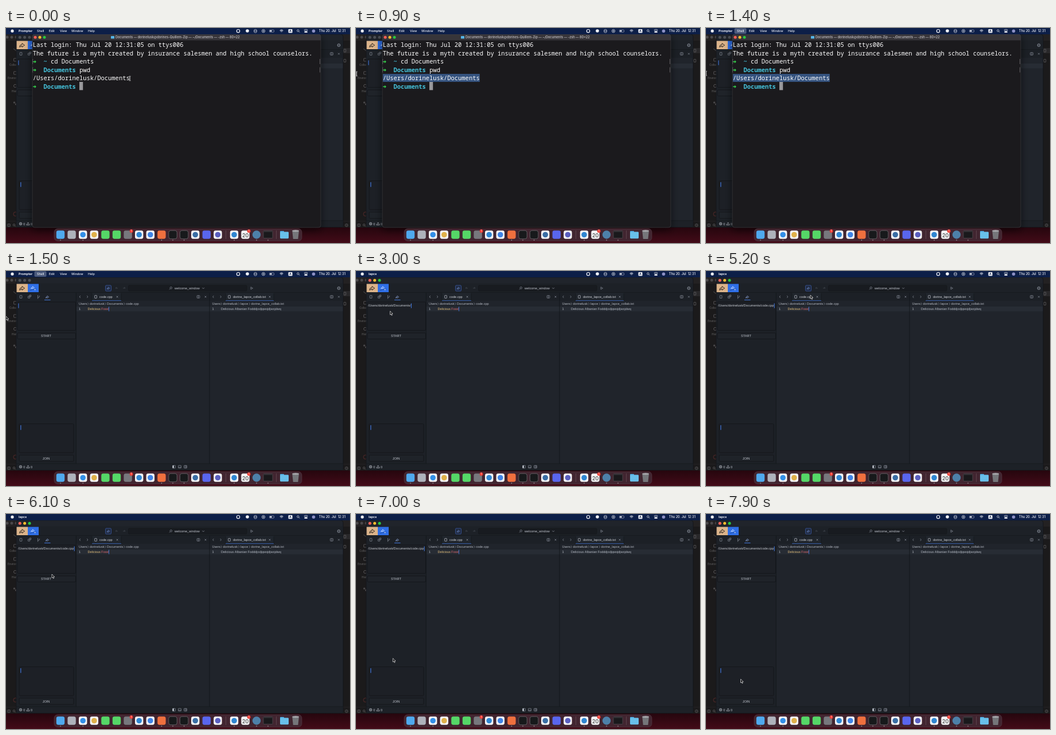
Recreate the animation shown at these times as an HTML page with a canvas. Size 600 by 375 pixels, loop 8000 ms.

```html
<!DOCTYPE html>
<html lang="en">
<head>
<meta charset="utf-8">
<title>Desktop session</title>
<style>
html, body { margin: 0; width: 100%; height: 100%; overflow: hidden; background: #2a0912; }
canvas { display: block; width: 600px; height: 375px; }
</style>
</head>
<body>
<canvas id="stage"></canvas>
<script>
const W = 600, H = 375, LOOP = 8000, STEP = 100;
const cv = document.getElementById('stage');
const dpr = window.devicePixelRatio || 1;
cv.width = W * dpr;
cv.height = H * dpr;
const c = cv.getContext('2d');

const SANS = '"Liberation Sans", Arial, sans-serif';
const UI = 'Inter, "Liberation Sans", sans-serif';
const MONO = '"Noto Sans Mono", "DejaVu Sans Mono", monospace';
const USER = 'dorinelusk';
const BLUE = '#3f74d8', DIM = '#8b919c', FAINT = '#4a505b', INK = '#c3c8d0', EDGE = '#14171b', NAVY = '#0d1f48';

// Event times in ms
const CLOSE = 1500, FOCUS = 2300, PASTE = 2700, TYPE = 3200, KEY = 150;

const pointer = [
  [0, 216, 88], [200, 216, 88], [800, 1, 80], [1600, 0, 79], [2200, 59, 69],
  [3000, 59.5, 70], [4500, 59.5, 70], [5100, 182, 42], [5300, 182, 42],
  [6000, 80, 105], [6500, 80, 105], [7200, 60.5, 288], [LOOP, 60.5, 288]
];

function pointerAt(t) {
  const i = pointer.findIndex(k => k[0] > t);
  const [t0, x0, y0] = pointer[i - 1], [t1, x1, y1] = pointer[i];
  const p = (t - t0) / (t1 - t0), e = p * p * (3 - 2 * p);
  return [x0 + (x1 - x0) * e, y0 + (y1 - y0) * e];
}

function rect(x, y, w, h, fill) {
  c.fillStyle = fill;
  c.fillRect(x, y, w, h);
}

function box(x, y, w, h, r, fill, stroke, lw = 0.7) {
  c.beginPath();
  c.roundRect(x, y, w, h, r);
  if (fill) { c.fillStyle = fill; c.fill(); }
  if (stroke) { c.strokeStyle = stroke; c.lineWidth = lw; c.stroke(); }
}

function disc(x, y, r, fill, stroke, lw = 0.7) {
  c.beginPath();
  c.arc(x, y, r, 0, 7);
  if (fill) { c.fillStyle = fill; c.fill(); }
  if (stroke) { c.strokeStyle = stroke; c.lineWidth = lw; c.stroke(); }
}

function line(pts, stroke, lw = 0.7) {
  c.beginPath();
  for (let i = 0; i < pts.length; i += 2) c.lineTo(pts[i], pts[i + 1]);
  c.strokeStyle = stroke;
  c.lineWidth = lw;
  c.stroke();
}

function shape(pts, fill) {
  c.beginPath();
  for (let i = 0; i < pts.length; i += 2) c.lineTo(pts[i], pts[i + 1]);
  c.closePath();
  c.fillStyle = fill;
  c.fill();
}

function text(s, x, y, size, fill, face = SANS, weight = 400, align = 'left') {
  c.font = `${weight} ${size}px ${face}`;
  c.textAlign = align;
  c.fillStyle = fill;
  c.fillText(s, x, y);
  return c.measureText(s).width;
}

function cross(x, y, col = DIM) {
  line([x - 1.4, y - 1.4, x + 1.4, y + 1.4], col);
  line([x + 1.4, y - 1.4, x - 1.4, y + 1.4], col);
}

function chevron(x, y, dir, col = DIM) {
  line([x - dir, y - 2, x + dir, y, x - dir, y + 2], col);
}

// side is 1 for a handle on the right, -1 on the left
function lens(x, y, col, side = 1) {
  disc(x, y, 1.7, null, col);
  line([x + side * 1.2, y + 1.2, x + side * 3, y + 3], col);
}

function page(x, y, col = DIM) {
  box(x - 1.8, y - 2.4, 3.6, 4.8, 0.5, null, col);
}

function split(x, y, col = DIM) {
  box(x - 2.4, y - 2.2, 4.8, 4.4, 0.5, null, col);
  line([x, y - 2.2, x, y + 2.2], col);
}

function share(x, y, s, col, lw = 0.8) {
  line([x - 4 * s, y + 3 * s, x - 3 * s, y, x, y - 1.2 * s, x, y - 3 * s, x + 4 * s, y,
    x, y + 3 * s, x, y + 1 * s, x - 4 * s, y + 3 * s], col, lw);
}

function lights(x, y, gap, cols) {
  cols.forEach((col, i) => disc(x + i * gap, y, 2.5, col));
}

function desktop() {
  const g = c.createLinearGradient(0, 348, 0, H);
  g.addColorStop(0, '#26060e');
  g.addColorStop(1, '#430b18');
  rect(0, 0, W, H, g);
}

function backWindow() {
  rect(0, 11, W, 337, '#1b1a1b');
  rect(0, 11, W, 11, '#232122');
  line([0, 337, W, 337], '#292829');
  const col = '#69686a';
  lights(2, 16, 8, ['#4a484a', '#4a484a', '#4a484a']);
  line([13, 36, 18, 40], col);
  box(13.5, 53, 5, 5, 0.5, null, col);
  text('Collections', 6, 66, 4.6, col, UI);
  box(13.5, 76, 5, 5, 0.5, null, col);
  text('Environments', 3, 89, 4.6, col, UI);
  disc(16, 101, 2.6, null, col);
  text('History', 10, 112, 4.6, col, UI);
  box(13.5, 129, 2, 2, 0, null, col);
  box(16.5, 132, 2, 2, 0, null, col);
  disc(16.5, 324.5, 3.6, null, '#6d3030');
  split(5, 344, col);
  lens(14, 343.5, col);
  rect(588, 35, 12, 9, '#29282a');
  page(591, 39.5, col);
  page(591, 57, col);
  disc(594, 344, 2.4, null, col);
  text('?', 594, 345.5, 4, col, UI, 400, 'center');
}

function crumbs(parts, y) {
  parts.forEach(([s, x], i) => {
    text(s, x, y, 5.6, '#b5bac3');
    if (i) chevron(x - 2.8, y - 2, 0.6, DIM);
  });
}

function editorPane(x, w, tabX, tabW, name) {
  rect(x, 38, w, 14, '#1c2026');
  chevron(x + 6.5, 45, -0.9, DIM);
  chevron(x + 19.5, 45, 0.9, DIM);
  rect(tabX, 38, tabW, 14, '#20252c');
  line([tabX, 39, tabX, 52], EDGE);
  line([tabX + tabW, 39, tabX + tabW, 52], EDGE);
  page(tabX + 6.5, 45, INK);
  text(name, tabX + 13, 47, 5.6, '#d3d6dc');
  cross(tabX + tabW - 7, 45);
  rect(tabX, 51.2, tabW, 0.9, '#3b65b5');
  split(x + w - 19.5, 45);
  cross(x + w - 7, 45);
  rect(x, 62, w, 8.4, '#272c34');
}

function editorWindow(t) {
  const active = t >= FOCUS;
  box(18, 11, 570, 336.5, 4, '#20242b', '#111317');
  rect(18.5, 21.5, 569, 16, '#1d2127');
  lights(24.2, 16.3, 8.4, active ? ['#ff5f57', '#febc2e', '#28c840'] : ['#4c4f55', '#4c4f55', '#4c4f55']);

  // toolbar
  rect(18.5, 22.5, 19.5, 14.5, '#dcb48a');
  rect(38, 22.5, 19, 14.5, '#2f6fe6');
  share(28, 30, 1.1, '#29231f', 1);
  share(46.5, 29, 0.7, '#cfe0ff', 0.8);
  disc(50.5, 32, 1.3, '#cfe0ff');
  line([42, 33.5, 53, 31], '#123c8c', 0.7);
  box(173.5, 25, 10, 10, 1.5, '#202a40', '#3d61b4');
  share(178.5, 30, 0.6, '#7897d8', 0.6);
  line([195, 30, 191, 30, 193, 28], FAINT);
  line([204, 30, 208, 30, 206, 28], FAINT);
  box(213.5, 25, 206.5, 10, 2, '#181b20', '#15171b');
  lens(287.8, 29.4, DIM, -1);
  text('welcome_window', 294, 32, 5.6, INK);
  line([342.3, 29, 344.2, 31, 346.1, 29], DIM);
  line([427, 28, 430.5, 30, 427, 32, 427, 27.7], DIM);
  disc(580.5, 30, 2.4, null, DIM, 1);
  disc(580.5, 30, 0.8, null, DIM, 0.5);
  line([18, 37.5, 588, 37.5], EDGE);

  // side panel
  rect(18.5, 38, 103.5, 298, '#1d2127');
  page(26, 45);
  box(38.5, 44, 3, 3.2, 0, null, DIM);
  box(41, 42, 2.6, 2.6, 0, null, DIM);
  line([55.5, 42, 55.5, 48.5], DIM);
  line([58.5, 43, 58, 45.5, 55.5, 46.5], DIM);
  share(72, 45.3, 0.65, '#8fa6d8', 0.7);
  rect(67, 50, 10.5, 1, BLUE);
  box(20, 54, 101.5, 49.5, 1.5, '#1d2026', EDGE, 1);
  box(20, 108, 101.5, 10.5, 1.5, '#1f2329', EDGE, 1);
  text('START', 70, 115.2, 5.6, INK, SANS, 400, 'center');
  box(23, 266.5, 95, 50.5, 1.5, '#1d2026', EDGE, 1);
  rect(25.2, 269, 1.2, 8.2, BLUE);
  box(23, 321, 95, 11, 1.5, '#1f2329', EDGE, 1);
  text('JOIN', 70, 328.6, 5.6, INK, SANS, 400, 'center');

  // path field
  const typed = Math.max(0, Math.floor((t - TYPE) / KEY));
  const path = t < PASTE ? '' : `/Users/${USER}/Documents/` + 'code.cpp'.slice(0, typed);
  const end = 21 + text(path, 21, 62.3, 5.6, '#c9cdd4');
  rect(end + 0.3, 56.5, 1.1, 8.2, BLUE);

  // editors
  editorPane(122.5, 232.5, 150, 51, 'code.cpp');
  crumbs([['Users', 127], [USER, 146], ['Documents', 176], ['code.cpp', 209]], 59.3);
  text('1', 127, 68.3, 5.5, INK);
  const w = text('Delicious ', 142.5, 68.3, 5.5, '#e5c07b');
  const w2 = text('Food', 142.5 + w, 68.3, 5.5, '#e06c75');
  rect(142.7 + w + w2, 62.2, 0.9, 8, BLUE);
  editorPane(355, 232.5, 383, 84, 'dorine_lapce_collab.txt');
  crumbs([['Users', 359.5], [USER, 378.5], ['lapce', 409], ['dorine_lapce_collab.txt', 427.5]], 59.3);
  text('1', 359.5, 68.3, 5.5, INK);
  text('Delicious Albanian Fodddjodjqwojdjwojdwq', 375, 68.3, 5.5, '#b4bac4');
  line([122.3, 38, 122.3, 336], EDGE, 0.9);
  line([355, 38, 355, 336], EDGE, 0.9);

  // status bar
  rect(18.5, 336, 569, 11, '#1d2127');
  line([18, 336, 588, 336], EDGE);
  disc(25.5, 341.5, 2.2, null, INK);
  cross(25.5, 341.5, INK);
  text('0', 30.3, 343.6, 5.6, INK);
  line([36, 343.5, 38.5, 339, 41, 343.5, 35.7, 343.5], INK);
  text('0', 43, 343.6, 5.6, INK);
  [293, 303, 313].forEach((x, i) => {
    box(x - 2.4, 339.2, 4.8, 4.6, 0.5, i === 2 ? '#30343b' : null, DIM);
    if (i === 0) rect(x - 2.4, 339.2, 2.2, 4.6, INK);
    if (i === 1) line([x - 2.4, 342.3, x + 2.4, 342.3], DIM);
    if (i === 2) line([x + 0.8, 339.2, x + 0.8, 343.8], DIM);
  });
}

function arrowMark(x, y) {
  const green = '#35c84a';
  line([x, y, x + 4, y], green, 1.5);
  shape([x + 2.8, y - 2.6, x + 5.8, y, x + 2.8, y + 2.6], green);
}

function shellWindow(t, px) {
  const CW = 6.26, X = 46.8, row = n => 33 + n * 14.5;
  c.save();
  c.shadowColor = 'rgba(0,0,0,.6)';
  c.shadowBlur = 14 * dpr;
  c.shadowOffsetY = 4 * dpr;
  box(46, 11, 503, 337, 4, '#1b1a1d');
  c.restore();
  box(46, 11, 503, 10.5, [4, 4, 0, 0], '#37353a');
  box(46, 11, 503, 337, 4, null, '#4b4a4e', 0.5);
  lights(51, 16.3, 8, ['#ff5f57', '#febc2e', '#28c840']);
  box(183, 14, 6, 4.6, 0.7, '#55b5ea');
  text(`Documents — ${USER}@dorines-Quillem-Zip — ~/Documents — -zsh — 80×22`, 191, 18.3, 5.5, '#b9b7bb', UI, 600);

  // selection grows leftwards under the drag
  const first = Math.max(0, Math.round((px - X) / CW));
  if (t > 200 && first < 27) rect(X + first * CW, 80, (27 - first) * CW, 14, '#35537f');

  const put = (s, col, n, fill = '#ffffff', weight = 500) =>
    text(s, X + col * CW, row(n), CW / 0.6, fill, MONO, weight);
  put('Last login: Thu Jul 20 12:31:05 on ttys006', 0, 0);
  put('The future is a myth created by insurance salesmen and high school counselors.', 0, 1);
  put('~', 3, 2, '#45c3dc', 700);
  put('cd Documents', 5, 2);
  put('Documents', 3, 3, '#45c3dc', 700);
  put('pwd', 13, 3);
  put(`/Users/${USER}/Documents`, 0, 4);
  put('Documents', 3, 5, '#45c3dc', 700);
  [2, 3, 5].forEach(n => arrowMark(X + 0.3, row(n) - 3.2));
  [2, 3].forEach(n => {
    rect(46.4, row(n) - 8, 0.7, 9, '#77757a');
    rect(547.3, row(n) - 8, 0.7, 9, '#77757a');
  });
  rect(X + 13 * CW - 0.2, 94, CW, 14.3, '#99989b');
}

function menuBar(t) {
  rect(0, 0, W, 11, NAVY);
  disc(11, 5.2, 2.6, '#f2f2f6');
  const ink = '#f2f4fa', y = 7.1;
  if (t < FOCUS) {
    if (t >= 1400 && t < 1700) box(49.5, 0.5, 21, 9.6, 2, '#4b5a7c');
    text('Prompter', 22, y, 5.3, ink, UI, 700);
    [['Shell', 54], ['Edit', 75], ['View', 94], ['Window', 114], ['Help', 143]]
      .forEach(([s, x]) => text(s, x, y, 5.3, ink, UI, 500));
  } else {
    text('lapce', 22, y, 5.3, ink, UI, 700);
  }
  disc(405, 5.2, 2.7, null, ink, 1.2);
  disc(421, 5, 2.8, ink);
  box(432.7, 2.6, 4.6, 5.4, 1.6, null, ink);
  line([432.7, 5.2, 437.3, 5.2], ink);
  disc(449, 5.2, 2.7, null, ink);
  shape([448.2, 3.8, 450.7, 5.2, 448.2, 6.6], ink);
  box(459.5, 3.2, 8, 4, 1.1, null, '#a9aec2');
  rect(460.4, 4.1, 3, 2.2, ink);
  for (const r of [1.3, 2.9, 4.4]) {
    c.beginPath();
    c.arc(480.5, 7.6, r, -2.3, -0.84);
    c.strokeStyle = ink;
    c.lineWidth = 0.9;
    c.stroke();
  }
  box(492.5, 2, 7, 6.6, 1.3, ink);
  text('A', 496, 7.2, 5.2, NAVY, UI, 600, 'center');
  lens(509.3, 4.6, ink);
  box(520.3, 2.6, 5.6, 2.2, 1.1, null, ink);
  box(520.3, 5.8, 5.6, 2.2, 1.1, ink);
  disc(536.5, 5.2, 2.8, '#8b8fc4');
  text('Thu 20. Jul  12:31', 592, y, 5.6, ink, UI, 500, 'right');
}

function badge(x) {
  disc(x + 6.2, 354.2, 2.9, '#f0382f');
  text('1', x + 6.2, 355.7, 4.2, '#fff', UI, 500, 'center');
}

function dock() {
  box(84, 350, 432, 21.5, 6, '#412530', '#5c444e', 0.5);
  const tile = (x, col, edge) => box(x - 7.2, 353.3, 14.4, 14.4, 3.4, col, edge);
  // a leading "o" stands for a coloured disc on a white tile
  const icon = (x, col) => {
    if (col[0] === 'o') {
      tile(x, '#f3f4f6');
      disc(x, 360.5, 4.8, col.slice(1));
    } else tile(x, col, col === '#17191b' ? '#77787a' : null);
  };
  ['#4fa9ee', '#aeb2bb', 'o#338fe8', 'o#dfb04b', '#55d767', '#55d767', '#77787d', 'o#2f86d2',
    'o#3f83e6', '#f0703e', '#17191b', '#17191b', 'o#3a6ea5', '#5966ee', 'o#5a5fc0'
  ].forEach((col, i) => icon(95 + i * 19.6, col));
  badge(212.4);
  rect(383.3, 353, 0.6, 15, '#6b5760');
  icon(398, 'o#2f86d2');
  tile(417.5, '#f4f4f5');
  text('20', 417.5, 365.4, 9, '#29292b', UI, 400, 'center');
  badge(417.5);
  disc(437, 360.5, 7.2, '#4d80a8');
  box(449, 353.5, 16, 13, 1, '#1a191c', '#5a585d', 0.6);
  rect(450, 354.5, 14, 1, '#454348');
  rect(471, 353, 0.6, 15, '#6b5760');
  box(478, 354, 7, 5, 1, '#4aa3d8');
  box(478, 355.6, 15, 11.6, 1.4, '#68bfea');
  shape([499.2, 353.5, 511, 353.5, 509.4, 368, 500.8, 368], '#75767a');
  c.beginPath();
  c.ellipse(505.1, 353.8, 6, 1.6, 0, 0, 7);
  c.fillStyle = '#a9aaae';
  c.fill();
  [95, 134.2, 271.4, 291, 310.6, 398, 437, 457].forEach(x => disc(x, 370, 0.7, '#c8bcc2'));
}

function drawPointer(x, y, beam) {
  if (beam) {
    const col = '#e4e4e6';
    line([x, y - 3.5, x, y + 3.5], col, 1);
    line([x - 1.6, y - 3.8, x + 1.6, y - 3.8], col);
    line([x - 1.6, y + 3.8, x + 1.6, y + 3.8], col);
    return;
  }
  c.save();
  c.translate(x, y);
  c.beginPath();
  [[0, 0], [0, 6.3], [1.5, 5], [2.6, 7.5], [3.7, 7], [2.7, 4.6], [4.7, 4.5]].forEach(p => c.lineTo(...p));
  c.closePath();
  c.fillStyle = '#0b0b0c';
  c.fill();
  c.strokeStyle = '#eeeef0';
  c.lineWidth = 0.7;
  c.stroke();
  c.restore();
}

function draw(t) {
  c.setTransform(dpr, 0, 0, dpr, 0, 0);
  const [px, py] = pointerAt(t);
  desktop();
  backWindow();
  editorWindow(t);
  if (t < CLOSE) shellWindow(t, px);
  menuBar(t);
  dock();
  drawPointer(px, py, t < CLOSE);
}

function tick() {
  const t = performance.now() % LOOP;
  draw(Math.floor(t / STEP) * STEP);
  requestAnimationFrame(tick);
}
tick();
</script>
</body>
</html>
```
